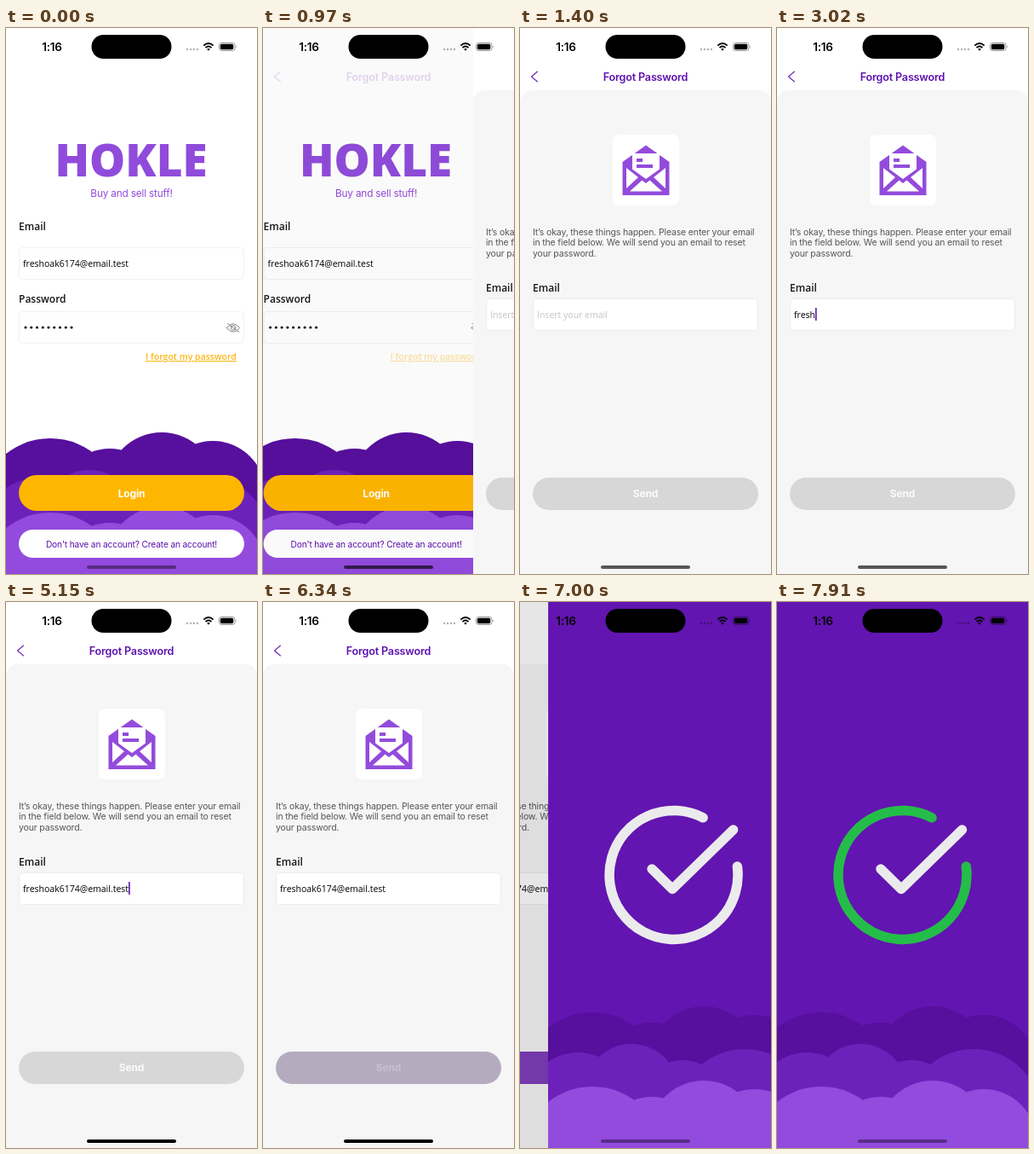
Write an HTML page that moves like this. It is 295 px wide and 640 px high and loops after 8 s.

```html
<!DOCTYPE html>
<html lang="en">
<head>
<meta charset="utf-8">
<title>Password reset flow</title>
<style>
  html, body { margin: 0; width: 100%; height: 100%; overflow: hidden; background: #fff; }
  svg { display: block; width: 100%; height: 100%; }
  text { white-space: pre; }
  .ui { font-family: Inter, "Liberation Sans", sans-serif; letter-spacing: -.015em; }
  .form { font-family: "Open Sans", "Noto Sans", sans-serif; font-size: 10.5px; }
  .label { font-size: 12px; font-weight: 600; fill: #161616; }
  .button { font-size: 12px; font-weight: 700; fill: #fff; }
  .mid { text-anchor: middle; }
  .field { fill: #fff; stroke: #ececec; }
  #login .field { stroke: #f1f1f1; }
  .dots { fill: none; stroke: #111; stroke-width: 3.2; stroke-linecap: round; stroke-dasharray: 0 6.75; }
  .line { fill: none; stroke-linecap: round; stroke-linejoin: round; }
</style>
</head>
<body>
<svg viewBox="0 0 295 640">
  <defs>
    <g id="puffs">
      <circle cx="52" cy="565" r="84"/>
      <circle cx="122" cy="553" r="60"/>
      <circle cx="183" cy="539" r="65"/>
      <circle cx="243" cy="546" r="62"/>
      <rect y="520" width="295" height="200"/>
    </g>
    <g id="clouds">
      <use href="#puffs" fill="#570f9d"/>
      <g fill="#6d21bb">
        <circle cx="35" cy="588" r="60"/>
        <circle cx="98" cy="573" r="55"/>
        <circle cx="158" cy="587" r="50"/>
        <circle cx="231" cy="604" r="80"/>
        <rect y="562" width="295" height="100"/>
      </g>
      <use href="#puffs" y="87" fill="#934bde"/>
    </g>
    <clipPath id="page"><rect width="295" height="640"/></clipPath>
  </defs>

  <g id="login"><g clip-path="url(#page)">
    <rect width="295" height="640" fill="#fff"/>
    <text class="form mid" x="147" y="174" style="font-size:53px;font-weight:800" fill="#904bdb">HOKLE</text>
    <text class="ui mid" x="147.5" y="198" font-size="11.8" fill="#904bdb">Buy and sell stuff!</text>

    <text class="form label" x="15" y="237">Email</text>
    <rect class="field" x="15.5" y="257.5" width="264" height="37" rx="4"/>
    <text class="form address" x="20" y="280"></text>

    <text class="form label" x="15" y="322">Password</text>
    <rect class="field" x="15.5" y="332.5" width="264" height="37" rx="4"/>
    <path class="dots" d="M23 351H78"/>
    <g class="line" stroke="#777" stroke-width=".9">
      <path d="M259.5 351.5Q267 342 274.5 351.5Q267 361 259.5 351.5Z"/>
      <circle cx="267" cy="351.5" r="2.7"/>
      <path d="M260.5 346.5L274 356.5"/>
    </g>
    <text class="form" id="link" x="164" y="389" font-weight="600" fill="#fdb714" text-decoration="underline">I forgot my password</text>

    <use href="#clouds"/>
    <rect x="15" y="524" width="265" height="42" rx="21" fill="#ffb600"/>
    <text class="ui button mid" x="147.5" y="549.5">Login</text>
    <rect x="15" y="588" width="265" height="33" rx="16.5" fill="#fff"/>
    <text class="ui mid" x="147.5" y="608.5" font-size="10.2" fill="#5d10ae">Don't have an account? Create an account!</text>
    <rect class="dim" width="295" height="640"/>
  </g></g>

  <g id="forgot"><g clip-path="url(#page)">
    <rect width="295" height="640" fill="#fff"/>
    <rect y="73" width="295" height="600" rx="14" fill="#f6f6f6"/>
    <rect x="109" y="125" width="78" height="83" rx="7" fill="#fff"/>
    <path fill="#934bdb" d="M120.500 157L148 137.500 175.500 157V196H120.500Z"/>
    <path fill="#fff" d="M132 147H164V165.500L148 177 132 165.500Z
      M125 164L139 175 125 188Z M171 164L157 175 171 188Z
      M129 191.500L143.500 178.500 148 182 152.500 178.500 167 191.500Z"/>
    <path fill="#934bdb" d="M137 153h7v4h-7z M137 160h19v4h-19z"/>

    <g class="ui" font-size="10.5" fill="#565656">
      <text x="15" y="242.500">It’s okay, these things happen. Please enter your email</text>
      <text x="15" y="255">in the field below. We will send you an email to reset</text>
      <text x="15" y="267.500">your password.</text>
    </g>

    <text class="form label" x="15" y="308.5">Email</text>
    <rect class="field" x="15.5" y="317.5" width="264" height="37" rx="4"/>
    <text class="form" id="hint" x="20" y="340" fill="#c4c4c4">Insert your email</text>
    <text class="form" id="typed" x="20" y="340"></text>
    <rect id="caret" y="328" width="1.7" height="15" fill="#6a20b6"/>

    <rect id="send" x="15" y="527" width="265" height="38" rx="19"/>
    <text class="ui button mid" id="sendText" x="147.5" y="550">Send</text>
    <rect class="dim" width="295" height="640"/>
  </g></g>

  <g id="header">
    <path class="line" d="M20.500 51L13.500 57 20.500 63" stroke="#6a20b6" stroke-width="1.1"/>
    <text class="ui mid" x="147.5" y="61.5" font-size="12.6" font-weight="600" fill="#5d10ae">Forgot Password</text>
  </g>

  <g id="done"><g clip-path="url(#page)">
    <rect width="295" height="640" fill="#6215b0"/>
    <use href="#clouds"/>
    <g class="line" stroke="#ebebed" stroke-width="11.5">
      <path id="ring" d="M182 252.800A75.500 75.500 0 1 0 222.300 310"/>
      <path d="M122 313L146 336.500 217.500 267"/>
    </g>
  </g></g>

  <g id="status">
    <text class="ui mid" x="54" y="26.7" font-size="13.6" font-weight="600">1:16</text>
    <rect x="100.5" y="8" width="94" height="28" rx="14"/>
    <path class="line" d="M213 25H226" stroke="#000" stroke-opacity=".3" stroke-width="2.4" stroke-dasharray="0 4"/>
    <path d="M232.300 20.600Q238 15.400 243.700 20.600M234.500 23.100Q238 20 241.500 23.100" fill="none" stroke="#000" stroke-width="1.9"/>
    <path d="M236.200 24.800Q238 23.300 239.800 24.800L238 26.800Z"/>
    <rect x="250.500" y="17.500" width="18.500" height="9" rx="2.800" fill="none" stroke="#000" stroke-opacity=".4"/>
    <rect x="251.800" y="18.800" width="15.500" height="6.400" rx="1.700"/>
    <path d="M270 20.500q1.500 1.500 0 3z" fill-opacity=".5"/>
    <rect id="homeBar" x="95" y="630" width="105" height="4" rx="2"/>
  </g>
</svg>

<script>
  const LOOP = 8000, WIDTH = 295;
  const address = 'freshoak6174@email.test';
  // [time, characters typed so far]
  const typing = [
    [2480, 1], [2720, 3], [2820, 4], [3020, 5], [3150, 6], [3260, 8],
    [3370, 9], [3480, 10], [3590, 12], [3920, 13], [4080, 14], [4220, 15],
    [4340, 16], [4520, 17], [4720, 18], [4870, 19], [5000, 21], [5150, 23]
  ];
  const $ = id => document.getElementById(id);
  const [login, forgot, header, done, link, hint, typed, caret, send, sendText, ring, homeBar] =
    ['login', 'forgot', 'header', 'done', 'link', 'hint', 'typed', 'caret', 'send', 'sendText', 'ring', 'homeBar'].map($);
  document.querySelector('.address').textContent = address;

  // Critically damped push, held in five steps.
  function push(t, start, step) {
    const n = Math.floor((t - start) / step);
    if (n < 0) return 0;
    if (n > 3) return 1;
    const x = 14.4 * (n * .105 + .05);
    return 1 - (1 + x) * Math.exp(-x);
  }

  function place(page, x, covered) {
    page.setAttribute('transform', `translate(${x - covered * .3 * WIDTH} 0)`);
    const dim = page.querySelector('.dim');
    if (dim) dim.setAttribute('opacity', covered * .11);
  }

  function draw(t) {
    const first = push(t, 970, 105), second = push(t, 6780, 110);
    place(login, 0, first);
    place(forgot, (1 - first) * WIDTH, second);
    place(done, (1 - second) * WIDTH, 0);
    header.setAttribute('opacity', first * Math.max(0, 1 - 1.3 * second));
    link.setAttribute('opacity', t < 790 ? 1 : .4);

    const count = typing.reduce((n, [at, len]) => t >= at ? len : n, 0);
    typed.textContent = address.slice(0, count);
    hint.setAttribute('opacity', count ? 0 : 1);
    caret.setAttribute('x', 20 + (count ? typed.getComputedTextLength() : 0));
    caret.setAttribute('opacity', t >= 2130 && t < 6340 ? 1 : 0);

    send.setAttribute('fill', t < 6340 ? '#d7d7d7' : t < 6780 ? '#b5abbf' : '#7f3fbb');
    sendText.setAttribute('opacity', t < 6340 ? .9 : t < 6780 ? .25 : 1);
    ring.setAttribute('stroke', t < 7710 ? '#ebebed' : t < 7910 ? '#88d49b' : '#25bd49');
    homeBar.setAttribute('opacity', t < 970 ? .42 : t < 5150 ? .65 : t < 6780 ? 1 : .4);
  }

  const origin = performance.now();
  function tick() {
    draw((performance.now() - origin) % LOOP);
    requestAnimationFrame(tick);
  }
  tick();
</script>
</body>
</html>
```
